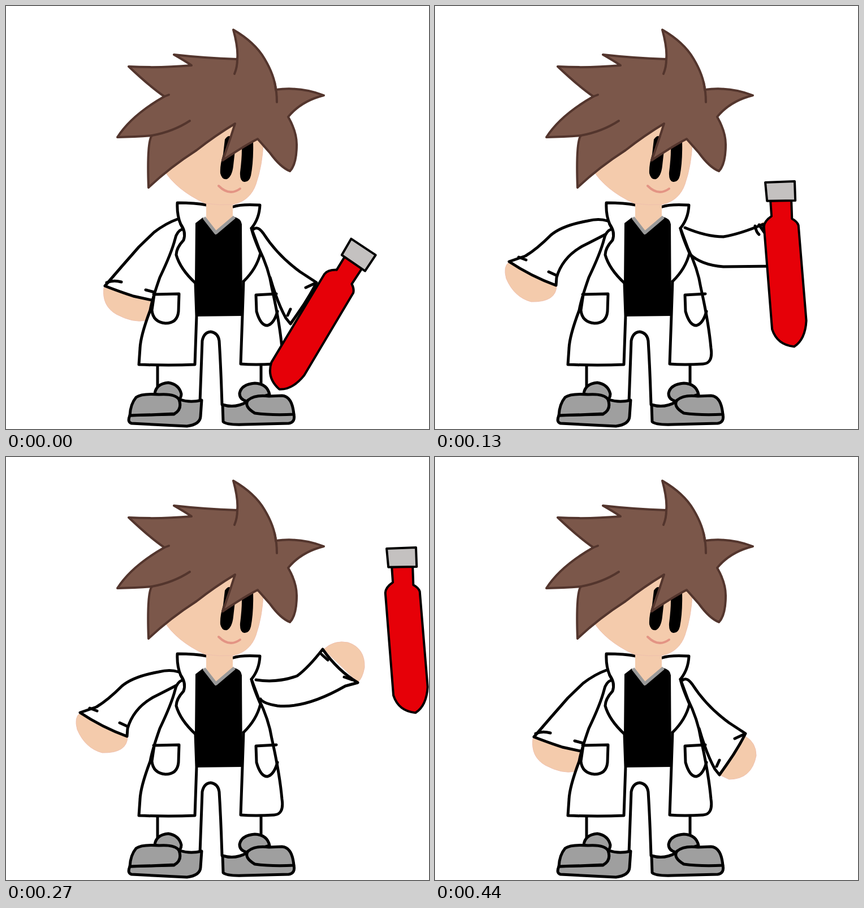
Animation of 748 by 748 pixels, one loop 0.47 s. Source, as an HTML page:

```html
<!DOCTYPE html>
<html>
<head>
<meta charset="utf-8">
<style>
  html, body { margin: 0; height: 100%; overflow: hidden; background: #fff }
  svg { display: block; width: 100vw; height: 100vh }
  path { fill: none; stroke: #000; stroke-width: 5; stroke-linecap: round; stroke-linejoin: round }
  .white { fill: #fff }
  .black { fill: #000; stroke: none }
  .skin { fill: #f4cbac; stroke: #efc0ae; stroke-width: 1 }
  .shoe { fill: #9f9f9f }
  .hair { fill: #7b574a; stroke: #53352d; stroke-width: 4 }
  .strand { stroke: #53352d; stroke-width: 4 }
  .liquid { fill: #e60008; stroke-width: 4 }
  .cap { stroke-width: 4 }
</style>
</head>
<body>
<svg viewBox="0 0 748 748">
  <g id="left"><path class="skin"/><path class="white"/><path/></g>
  <g id="right"><path class="skin"/><path class="white"/><path/></g>

  <!-- legs and shoes -->
  <path d="M268 636V672M451 637V668M343 700Q345 650 347 592Q350 577 362 576Q375 578 377 592Q380 640 382 705"/>
  <path class="shoe" d="M308 696Q325 702 346 697L344 726Q343 740 320 743L222 738Q214 736 219 724L297 722Z"/>
  <path class="shoe" d="M263 686Q265 668 287 666Q306 669 310 686Q310 692 306 696Z"/>
  <path class="shoe" d="M219 724Q220 704 230 692Q240 685 270 687Q300 685 306 696Q312 713 298 721Q260 723 219 724Z"/>
  <path class="shoe" d="M383 705Q405 712 426 700L509 722Q512 736 500 738L420 740Q390 741 384 735Z"/>
  <path class="shoe" d="M426 699Q413 696 413 685Q416 669 440 667Q462 668 466 687Z"/>
  <path class="shoe" d="M509 722Q506 690 488 689L465 690Q440 687 428 697Q420 708 440 720Q470 724 509 722Z"/>

  <!-- coat -->
  <path class="white" d="M355 352Q335 348 303 348Q302 370 309 386L313 394Q302 398 299 412Q293 436 272 480Q258 520 255 538Q238 583 237 605L235 634Q290 636 334 634L337 548L335 490"/>
  <path d="M309 386Q319 400 314 414Q301 428 301 440Q308 465 335 490"/>
  <path class="white" d="M402 355Q415 350 449 352Q448 376 434 393L447 428Q465 465 470 498Q484 560 488 605Q492 632 474 633Q440 635 415 633L418 548L420 487"/>
  <path d="M434 393Q437 407 450 437Q443 465 420 487"/>
  <path d="M261 510L306 509L305 540Q303 561 282 561Q260 559 258 538L262 511"/>
  <path d="M478 509L442 511L443 540Q450 565 462 565Q474 562 480 540"/>
  <path class="black" d="M335 384L348 374L371 400L404 373Q416 376 417 386L418 548L337 549L334 490Z"/>

  <!-- head -->
  <path class="skin" style="stroke:none" d="M354 340V376L371 398L401 374V340Z"/>
  <path d="M350 374L371 401L404 373" style="stroke:#999;stroke-width:6;stroke-linecap:butt"/>
  <path class="skin" d="M278 288Q300 325 352 349Q378 353 402 351Q432 344 442 315Q454 280 455 240L405 200L340 240Z"/>
  <path class="black" d="M387 236Q394 226 399 233L405 255L402 282Q400 301 391 306Q382 308 379 296Q378 282 384 262Z"/>
  <path class="black" d="M419 238H437Q438 275 433 300Q430 312 421 311Q413 309 414 294Q417 270 417 255Z"/>
  <path d="M376 318Q395 337 414 323" style="stroke:#e39484;stroke-width:4"/>
  <path class="hair" d="M402 42Q440 64 457 93Q475 123 477 148Q520 142 562 158Q522 168 499 196Q514 222 514 245Q514 280 502 292Q485 285 467 260L445 235Q420 248 383 273Q395 240 405 208Q370 229 337 255Q290 285 252 321Q249 240 258 229Q230 231 197 232Q222 193 280 160Q255 143 217 107Q270 110 328 105Q318 98 297 86Q350 92 409 94Q411 75 402 42Z"/>
  <path class="strand" d="M409 94Q409 108 404 120M475 135Q479 152 479 170M258 229Q296 222 325 203M280 160L288 157"/>

  <g id="tube">
    <path class="liquid" d="M-18 33L-17 60Q-30 68 -31 78L-23 260Q-15 288 15 292Q35 280 38 247L30 78Q28 71 19 66L19 33Z"/>
    <path class="cap" d="M-26 0L26 0L26 34L-24 33Z"/>
  </g>
</svg>
<script>
// each arm: hand, sleeve, cuff creases
const leftArms = {
  low: ["M173 498Q169 530 195 545Q225 561 247 556L258 520Z",
    "M303 377Q283 384 262 400L235 426Q205 460 175 495Q195 503 225 513L262 521L315 400",
    "M178 489Q190 484 204 488M247 502L262 506"],
  out: ["M142 452Q130 470 134 487Q147 522 185 527Q212 522 221 501Z",
    "M303 375Q270 380 235 396Q200 413 172 438Q163 450 141 448Q160 465 221 501L222 488Q245 455 275 424L298 403L306 388Z",
    "M154 446L172 451M208 477L222 486"],
  bent: ["M131 453Q120 460 126 482Q140 515 170 523Q215 524 215 494Z",
    "M305 380Q290 375 270 380Q225 388 205 405Q180 430 160 442L131 452Q170 478 214 494L215 480Q225 445 260 425Q280 415 303 403",
    "M148 444L161 449M201 470L214 476"],
  high: ["M121 440Q114 447 120 470Q140 506 172 506Q207 503 211 473Z",
    "M305 380Q285 366 255 362Q225 353 210 357Q195 365 170 395L140 428L121 440Q160 461 210 473L212 455Q225 420 232 410L303 403",
    "M137 429L151 434M193 449L211 454"]
};
const rightArms = {
  low: ["M549 494Q568 505 568 528Q560 570 520 570L503 562Z",
    "M437 395Q445 388 455 402Q480 441 520 470L549 489Q535 517 515 545L503 562L495 552Q480 525 467 480",
    "M530 498L545 491M498 547L503 536"],
  out: ["M577 449Q608 463 610 490Q605 530 570 533L560 530Z",
    "M440 394Q490 427 540 440L577 449Q573 490 560 529L549 521Q490 490 468 462L445 430",
    "M567 451Q561 455 562 466M551 507L551 524"],
  lift: ["M568 392Q580 377 592 384L600 420L580 430Z",
    "M442 392Q480 408 510 408Q540 403 580 386L600 460L510 461Q470 458 450 438",
    "M566 389Q568 400 573 404M573 387L582 400"],
  drink: ["M490 290L550 285L540 265L495 270Z",
    "M445 393Q482 376 484 360L487 298L481 290L563 283L545 345Q538 395 520 408Q490 428 448 428",
    "M483 297Q490 301 501 298M544 295L560 296"],
  wave: ["M562 340Q580 323 605 328Q635 338 634 372Q630 393 622 398Z",
    "M442 394Q480 400 515 387Q535 372 560 340Q587 378 622 399L600 405Q530 445 480 440Q455 436 450 428",
    "M558 349L569 359M598 389L612 394"]
};
// end time, left arm, right arm, tube [x, y, angle]
const poses = [
  [70, "low", "low", [632, 426, 33.5]],
  [130, "out", "out", [638, 357, 14.5]],
  [200, "bent", "lift", [610, 311, -2]],
  [270, "high", "drink", [374, 258, -91.5]],
  [330, "bent", "wave", [699, 161, -2]],
  [400, "out", "out"],
  [470, "low", "low"]
];
const $ = id => document.getElementById(id);
const tube = $("tube"), cap = tube.lastElementChild;

function setArm(id, shapes) {
  [...$(id).children].forEach((path, i) => path.setAttribute("d", shapes[i]));
}

function draw(now) {
  const t = now % 470;
  const [, left, right, place] = poses.find(p => t < p[0]);
  setArm("left", leftArms[left]);
  setArm("right", rightArms[right]);
  tube.style.display = place ? "" : "none";
  if (place) {
    const [x, y, angle] = place;
    tube.setAttribute("transform", `translate(${x} ${y}) rotate(${angle})`);
  }
  // the cap turns to clear glass over the face
  cap.style.fill = right === "drink" ? "rgba(255,255,255,.83)" : "#c4c1c0";
  requestAnimationFrame(draw);
}
draw(0);
</script>
</body>
</html>
```
